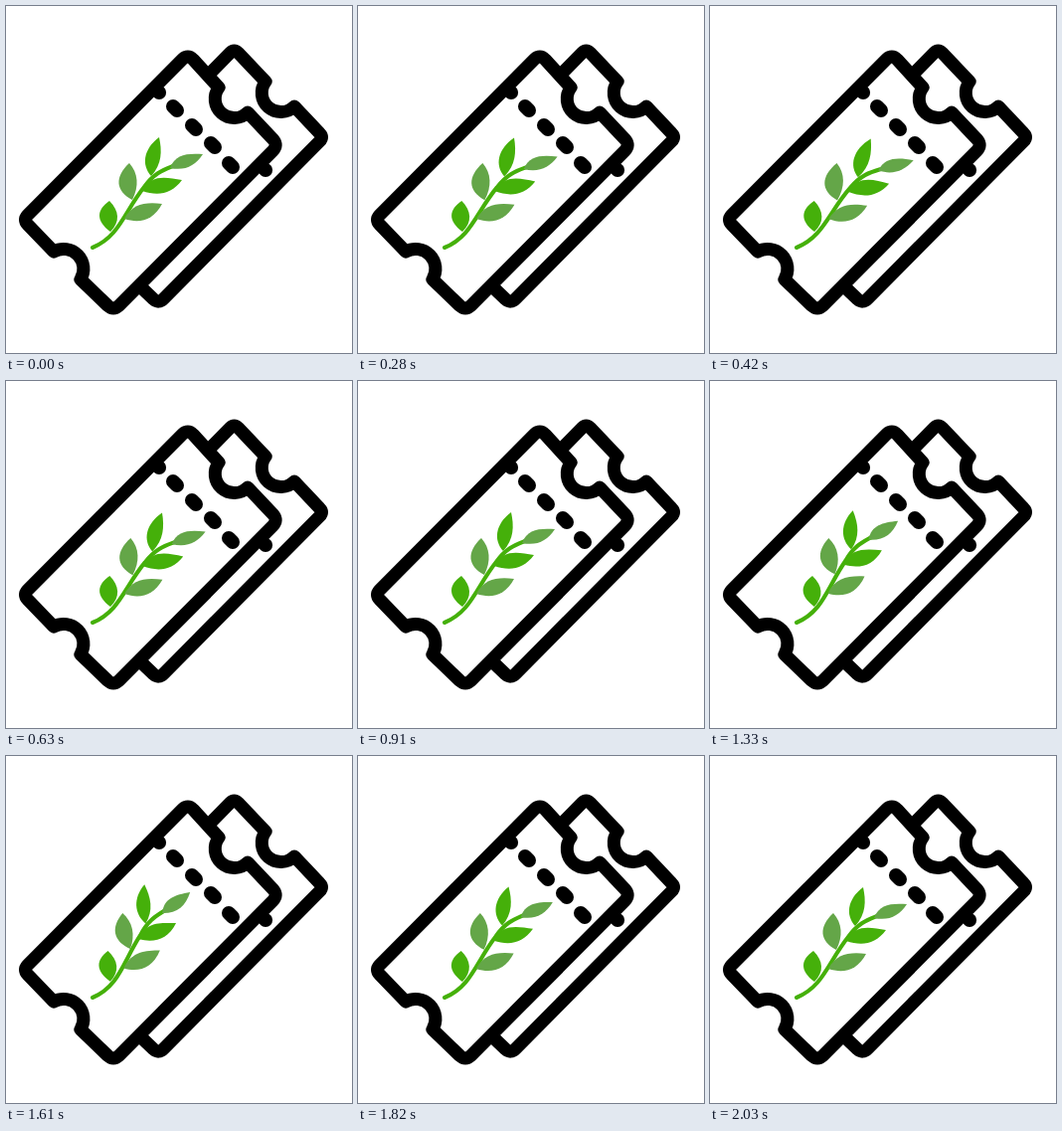
Recreate the animation shown at these times as an HTML page. Size 348 px wide and 349 px high, loop 2100 ms.

```html
<!DOCTYPE html>
<html lang="en">
<head>
<meta charset="utf-8">
<title>Tickets with swaying sprig</title>
<style>
  html, body { margin: 0; width: 100%; height: 100%; overflow: hidden; background: #fff; }
  svg { display: block; width: 100%; height: 100%; }
  .ink { fill: none; stroke: #000; stroke-width: 13; stroke-linecap: round; stroke-linejoin: round; }
  .paper { fill: #fff; }
  .dots { stroke-width: 14; }
</style>
</head>
<body>
<svg viewBox="0 0 348 349">
  <g class="ink">
    <path d="M201,72 L225.5,47 Q229.5,43 233.5,47 L261,76 A19.2,19.2 0 0 0 290,101 L315.5,128 Q319.5,132 315.5,136 L158.5,294.5 Q153.5,299.5 148.5,295 L136,283"/>
    <path class="dots" d="M261,165 h.1"/>
    <path class="paper" d="M21.5,210.5 L177.5,53.5 Q183,48.5 188,53.5 L214,82 A19.2,19.2 0 0 0 243,107 L269,134.5 Q273.5,140 268.5,145.5 L113.5,301.5 Q108,306.5 102.5,301.5 L75,275 A20.1,20.1 0 0 0 48,247 L21.5,219.5 Q17.5,215 21.5,210.5 Z"/>
    <path class="dots" d="M154,87 h.1 M168,101 l4,4 M187,120 l4,4 M206,138 l4,4 M224,158 l4,4"/>
  </g>
  <g id="sprig"></g>
</svg>
<script>
const BRIGHT = '#45b00a', PALE = '#64a648';
const STEP = 70, STEPS = 30, RIGHT_STEPS = 13;
const ROOT = { x: 87, y: 243 };

const leaves = [
  [BRIGHT, 'M105,227 C90,216 91,205 104,196 C114,206 115,217 105,227Z'],
  [PALE, 'M127,195 C110,186 109,172 124,158 C133,168 134,181 127,195Z'],
  [BRIGHT, 'M146,171 C136,160 138,144 154,132 C157,146 157,159 146,171Z'],
  [PALE, 'M165,163 C170,149 182,148 198,149 C190,161 180,166 165,163Z'],
  [BRIGHT, 'M137,186 C146,169 160,172 177,175 C166,190 152,191 137,186Z'],
  [PALE, 'M119,214 C127,199 140,197 157,199 C148,216 134,219 119,214Z']
];
const stem = 'M87,243 C114,232 119,207 139,182 C149,168 158,165 168,161';

const sprig = document.getElementById('sprig');
function addPath(shape, attrs) {
  const el = document.createElementNS('http://www.w3.org/2000/svg', 'path');
  for (const name in attrs) el.setAttribute(name, attrs[name]);
  sprig.append(el);
  return { el, shape };
}
const parts = [
  addPath(stem, { fill: 'none', stroke: BRIGHT, 'stroke-width': 4.1, 'stroke-linecap': 'round' }),
  ...leaves.map(([fill, shape]) => addPath(shape, { fill }))
];

// Curve a point about the root, in coordinates along and across the stem.
function bend(x, y, k) {
  const u = x - ROOT.x, v = ROOT.y - y, r = Math.SQRT1_2;
  const along = Math.max(0, (u + v) * r), across = (v - u) * r;
  const shift = k * along ** 2.5;
  const a = along - 2 * k * along ** 1.5 * across - 0.2 * shift;
  const c = across + shift;
  return [ROOT.x + (a - c) * r, ROOT.y - (a + c) * r];
}

// A short lean to the right, then a longer and wider one to the left.
function sway(step) {
  const hump = p => Math.sin(Math.PI * p) ** 5;
  return step < RIGHT_STEPS
    ? -3.75e-5 * hump(step / RIGHT_STEPS)
    : 8.4e-5 * hump((step - RIGHT_STEPS) / (STEPS - RIGHT_STEPS));
}

const start = performance.now();
function draw() {
  const time = Math.max(0, performance.now() - start);
  const k = sway(Math.floor(time / STEP) % STEPS);
  for (const { el, shape } of parts) {
    el.setAttribute('d', shape.replace(/(\d+),(\d+)/g,
      (_, x, y) => bend(+x, +y, k).map(n => n.toFixed(2)).join()));
  }
  requestAnimationFrame(draw);
}
draw();
</script>
</body>
</html>
```
